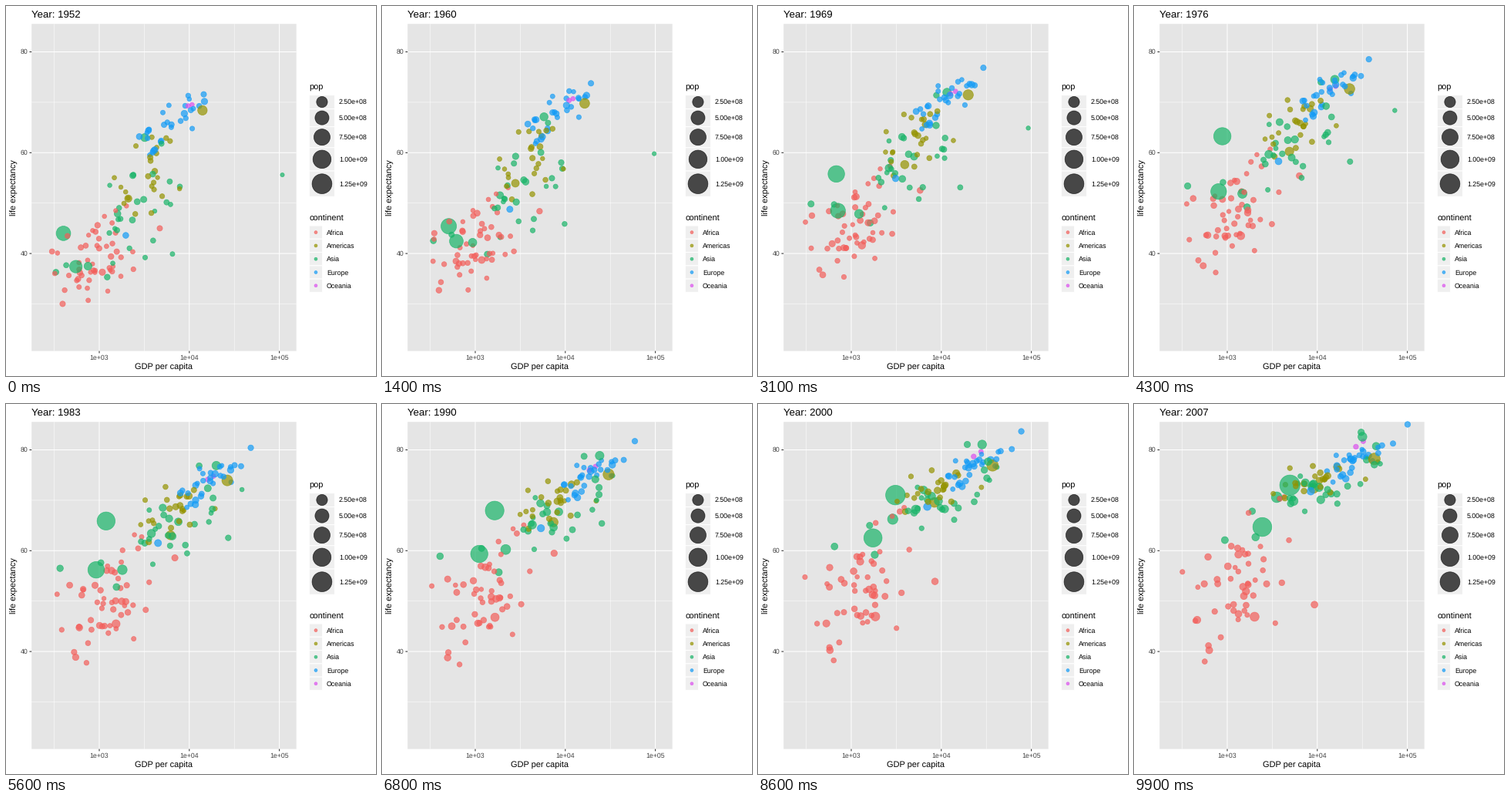
These frames come from a looping animation (480 px wide and 480 px high, 10000 ms). A matplotlib script:

```python
import numpy as np
import matplotlib.pyplot as plt
from matplotlib.animation import FuncAnimation
from matplotlib.patches import Rectangle

plt.rcParams.update({"font.family": "Liberation Sans", "text.hinting": "none",
                     "path.snap": False})
rng = np.random.default_rng(11)

FRAMES, STEP = 100, 9          # frames per loop, frames between two surveys
SURVEYS = 12                   # 1952, 1957 ... 2007
LEFT, TOP, RIGHT, BOTTOM = 33.2, 23.2, 376.7, 447.6
PANEL, KEY = "#e5e5e5", "#efefef"
COLORS = {"Africa": "#f35e5a", "Americas": "#949300", "Asia": "#18b468",
          "Europe": "#129bf6", "Oceania": "#dc50ee"}

# Bubbles that stand out: population (millions), GDP (thousands) and life
# expectancy, each given by a few evenly spaced key points.
LANDMARKS = [
    ("Asia", [556, 1319], [.4, .7, 1.5, 4.96], [44, 46, 63.3, 66.4, 70, 73]),
    ("Asia", [372, 1110], [.55, .72, 1.03, 2.45], [37.4, 49.3, 59.2, 64.7]),
    ("Asia", [82, 224], [.75, 3.54], [37.5, 70.6]),
    ("Asia", [86, 127], [3.2, 13, 24, 31.7], [63, 72.7, 78.7, 82.6]),
    ("Asia", [.2, 2.5], [108, 93, 92, 30, 39, 47], [55.6, 65.5, 75, 77.6]),
    ("Asia", [4, 28], [6.5, 28, 21.7], [39.9, 61, 72.8]),
    ("Asia", [20, 48], [.33, .36, .37, .94], [36.3, 51, 58.9, 62.1]),
    ("Americas", [158, 301], [14, 43], [68.4, 78.2]),
    ("Americas", [57, 190], [2.1, 4.1, 7.4, 9.1], [50.9, 72.4]),
    ("Africa", [33, 135], [1.08, 2.01], [36.3, 42, 47, 46.9]),
    ("Africa", [14, 44], [4.7, 9.3], [45, 53, 61, 49.3]),
    ("Europe", [22, 71], [1.97, 8.46], [43.6, 55.8, 64, 71.8]),
]

# The crowd: count, mean log GDP, its spread, mean life expectancy,
# slope of life over log GDP, scatter around it, typical population.
CROWDS = {
    "Africa": (50, [2.98, 3.1, 3.13], [.26, .36],
               [39, 49.5, 54.5], [5, 10], [4.5, 6.5], [4, 13]),
    "Americas": (23, [3.5, 3.76, 3.92], [.2, .24],
                 [54, 66.5, 73.7], [22, 6], [5, 2], [5, 14]),
    "Asia": (26, [3.3, 3.65, 3.92], [.34, .44],
             [47.5, 62.5, 71.5], [10, 8], [5.5, 3.5], [9, 30]),
    "Europe": (29, [3.75, 4.14, 4.38], [.22, .25],
               [65.5, 72.8, 77.7], [11, 9], [2, 1.2], [9, 11]),
    "Oceania": (2, [4.01, 4.2, 4.47], [.02, .06],
                [69.2, 73.2, 81], [0, 5], [.2, .4], [4, 9]),
}


def path(points):
    """Values at every survey for evenly spaced key points."""
    return np.interp(np.linspace(0, 1, SURVEYS),
                     np.linspace(0, 1, len(points)), points)


def drift(n):
    """Unit deviations that wander slowly, one row per bubble."""
    a, b = np.clip(rng.normal(size=(2, n)), -1.9, 1.9)
    ends = np.c_[a, 0.85 * a + 0.5 * b]
    return np.array([path(e) for e in ends]) + rng.normal(0, .07, (n, SURVEYS))


def crowd(n, gdp, gdp_sd, life, slope, life_sd, pop):
    dx = path(gdp_sd) * drift(n)
    x = path(gdp) + dx
    y = path(life) + path(slope) * dx + path(life_sd) * drift(n)
    p = path(pop) * np.exp(np.clip(rng.normal(0, .9, (n, 1)), -2, 1.5))
    return p, x, y


def size(pop):
    return 2 + 10 * np.sqrt(pop / 1319)


def area(s):
    return (0.75 * (2.845 * np.asarray(s) + 0.945)) ** 2


def px(log_gdp):
    return 121 + 116.8 * (log_gdp - 3)


def py(life):
    return 190.3 - 6.54 * (life - 60)


rows = [(name, path(pop), path(np.log10(gdp) + 3), path(life))
        for name, pop, gdp, life in LANDMARKS]
for name, rule in CROWDS.items():
    rows += [(name, *row) for row in zip(*crowd(*rule))]
rows = [rows[i] for i in rng.permutation(len(rows))]

names, pops, xs, ys = zip(*rows)
S, X, Y = size(np.array(pops)), px(np.array(xs)), py(np.array(ys))

fig = plt.figure(figsize=(480 / 72, 480 / 72), dpi=72, facecolor="white")
ax = fig.add_axes([0, 0, 1, 1])
ax.set_xlim(0, 480)
ax.set_ylim(480, 0)
ax.axis("off")


def box(x, y, w, h, fill, edge="none"):
    ax.add_patch(Rectangle((x, y), w, h, fc=fill, ec=edge, lw=1.07, zorder=0))


def line(x, y, color="white", lw=1.07, z=2):
    ax.plot(x, y, color=color, lw=lw, zorder=z, solid_capstyle="butt")


def label(x, y, s, fs=8.8, color="black", **kw):
    return ax.text(x, y, s, fontsize=fs, color=color, **kw)


def dots(x, y, s, colors):
    return ax.scatter(x, y, s=area(s), facecolors=colors, edgecolors=colors,
                      alpha=0.7, linewidths=0.71, zorder=3)


# panel, grid and axes
box(LEFT, TOP, RIGHT - LEFT, BOTTOM - TOP, PANEL)
for v in (2.5, 3.5, 4.5):
    line([px(v)] * 2, [TOP, BOTTOM], lw=0.53, z=1)
for v in (30, 50, 70):
    line([LEFT, RIGHT], [py(v)] * 2, lw=0.53, z=1)
for v in (3, 4, 5):
    line([px(v)] * 2, [TOP, BOTTOM])
    line([px(v)] * 2, [BOTTOM, BOTTOM + 2.75], "#333333")
    label(px(v), 459.2, f"1e+0{v}", color="#444444", ha="center")
for v in (40, 60, 80):
    line([LEFT, RIGHT], [py(v)] * 2)
    line([LEFT - 2.75, LEFT], [py(v)] * 2, "#333333")
    label(28.3, py(v) + 2.8, str(v), color="#444444", ha="right")
label((LEFT + RIGHT) / 2, 472, "GDP per capita", 11, ha="center")
label(16.5, (TOP + BOTTOM) / 2, "life expectancy", 11, rotation=90,
      ha="right", va="center")
title = label(LEFT, 15.3, "", 13.2)

# legends
keys = []
label(393.3, 108.4, "pop", 11)
y = 115.5
for v in (250, 500, 750, 1000, 1250):
    s = size(v)
    h = 2.835 * s
    box(393.3, y, 33.3, h, KEY, "white")
    keys.append((409.95, y + h / 2, s, "black"))
    label(432, y + h / 2 + 2.8, f"{v * 1e6:.2e}")
    y += h

label(393.3, 279, "continent", 11)
for i, (name, color) in enumerate(COLORS.items()):
    y = 285 + 17.28 * i
    box(393.3, y, 17.28, 17.28, KEY, "white")
    keys.append((401.95, y + 8.64, 1.5, color))
    label(416, y + 11.8, name)
dots(*zip(*keys))

bubbles = dots(X[:, 0], Y[:, 0], S[:, 0], [COLORS[n] for n in names])


def draw(k):
    a, f = divmod(k, STEP)
    b, f = min(a + 1, SURVEYS - 1), f / STEP
    x, y, s = (v[:, a] + (v[:, b] - v[:, a]) * f for v in (X, Y, S))
    bubbles.set_offsets(np.c_[x, y])
    bubbles.set_sizes(area(s))
    title.set_text(f"Year: {round(1952 + 55 * k / (FRAMES - 1))}")
    return bubbles, title


anim = FuncAnimation(fig, draw, frames=FRAMES, interval=100, repeat=True,
                     repeat_delay=0)
plt.show()
```
